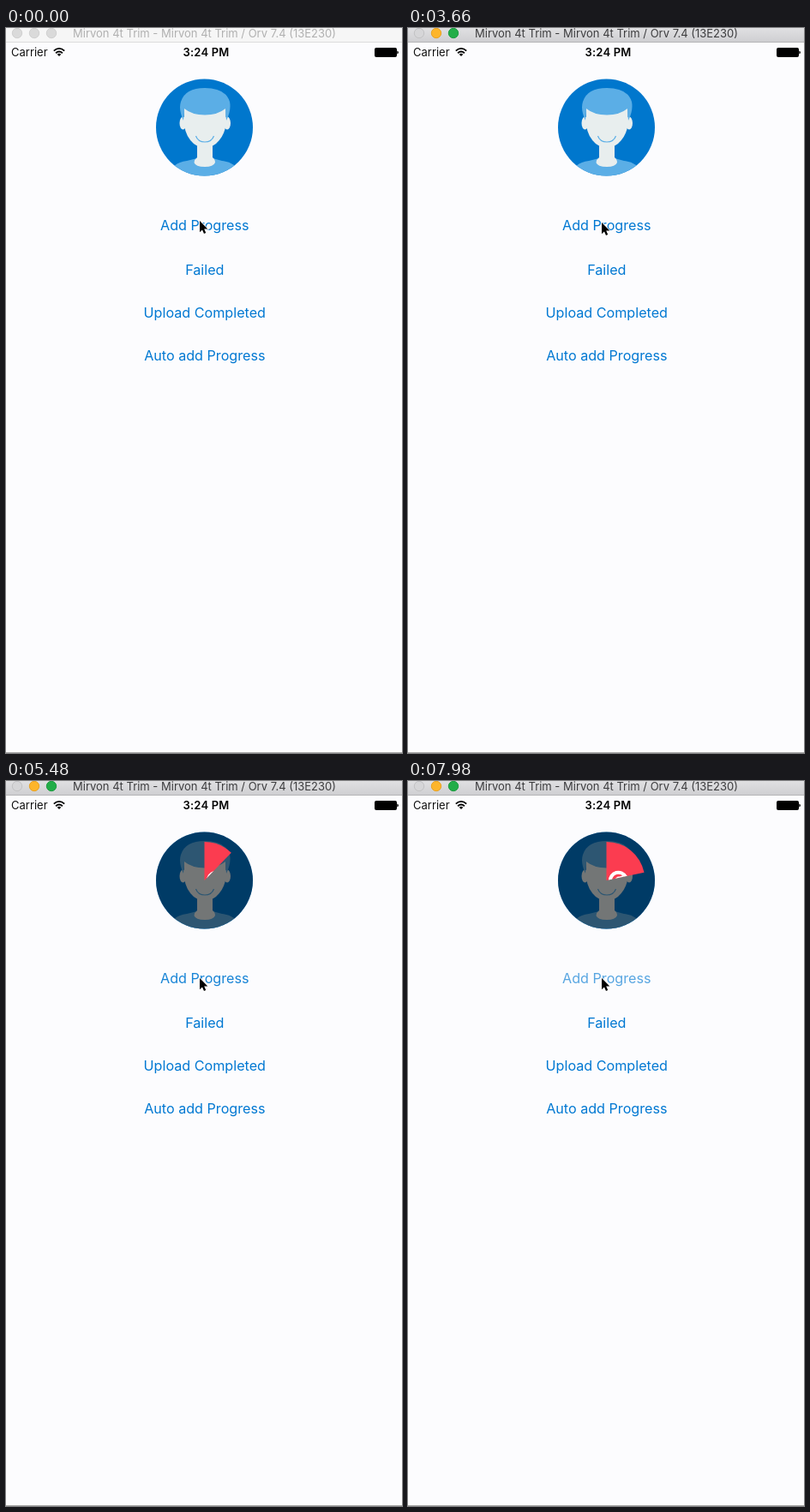
An HTML page that plays this animation: 462x846 px, repeating every 8000 ms.

```html
<!DOCTYPE html>
<html lang="en">
<head>
<meta charset="utf-8">
<title>Upload progress</title>
<style>
  html, body { margin: 0; width: 100%; height: 100%; overflow: hidden; background: #fcfcfe; }
  svg { display: block; width: 462px; height: 846px; }
  text { font-family: Inter, "Open Sans", sans-serif; font-size: 13px; }
  .mid { text-anchor: middle; }
  .button { font-size: 16.15px; fill: #0078d2; text-anchor: middle; }
  .skin { fill: #e8eeee; }
  .cloth { fill: #5baee6; }
</style>
</head>
<body>
<svg viewBox="0 0 462 846">
  <defs>
    <linearGradient id="active" x2="0" y2="1">
      <stop offset="0" stop-color="#e0e0e2"/>
      <stop offset="1" stop-color="#cfcfd2"/>
    </linearGradient>
    <clipPath id="disc"><circle cx="231.5" cy="116" r="56.5"/></clipPath>
    <clipPath id="slice"><path id="sliceShape"/></clipPath>
  </defs>
  <rect width="462" height="846" fill="#fcfcfe"/>

  <rect id="bar" width="462" height="16"/>
  <rect id="barEdge" y="16" width="462" height="1"/>
  <g id="lights" stroke-width="1">
    <circle cx="13" cy="6" r="5.7"/>
    <circle cx="33" cy="6" r="5.7"/>
    <circle cx="53" cy="6" r="5.7"/>
  </g>
  <text id="title" class="mid" x="231.5" y="11">Mirvon 4t Trim - Mirvon 4t Trim / Orv 7.4 (13E230)</text>

  <text x="6" y="33.3" fill="#111">Carrier</text>
  <g fill="none" stroke="#000" stroke-width="1.8">
    <path d="M55.8 26.6Q62 21.2 68.2 26.6M58.1 29.2Q62 25.8 65.9 29.2"/>
    <path d="M62 33L59.7 30.7Q62 28.9 64.3 30.7Z" fill="#000" stroke="none"/>
  </g>
  <text class="mid" x="233.5" y="33.3" font-weight="600" letter-spacing=".2">3:24 PM</text>
  <rect x="430" y="23" width="26" height="11" rx="2"/>
  <path d="M456.3 26.5q1.6 .5 1.6 2t-1.6 2z"/>

  <g clip-path="url(#disc)">
    <rect x="174" y="59" width="115" height="115" fill="#0077cd"/>
    <path class="cloth" d="M190 173Q193 157 211 155L223 152H241L252 155Q270 157 274 173Z"/>
    <path class="skin" d="M223 134H241V151Q244 153 244 157Q242 162 232 162Q221 162 219.5 157Q220 153 223 151Z"/>
    <ellipse class="skin" cx="206.5" cy="111" rx="4" ry="7.5"/>
    <ellipse class="skin" cx="258" cy="111" rx="4" ry="7.5"/>
    <path class="skin" d="M207.5 88H256.5V114Q254 127 245 135Q238 140 232 140Q226 140 219 135Q210 127 208 114Z"/>
    <path class="cloth" d="M207 108Q201 95 204 86Q209 70 232 70Q256 70 261 86Q263 96 257 108L256 94Q247 101.5 232 101.5Q217 101.5 208 94Z"/>
    <path d="M221.5 126Q224 133 232 133Q240 133 242.5 126" fill="none" stroke="#5baee6" stroke-width="1.2"/>
  </g>
  <g id="progress">
    <circle cx="231.5" cy="116" r="56.5" fill="#000" opacity=".5"/>
    <g clip-path="url(#slice)">
      <rect x="186" y="70" width="92" height="92" fill="#fb3c50"/>
      <path d="M236 117A9.5 9.5 0 0 1 254 112" fill="none" stroke="#fff" stroke-width="4"/>
      <path d="M241 117Q242 111 247 111.5L251 110V117Z" fill="#fff"/>
    </g>
  </g>

  <text id="add" class="button" x="231.8" y="236">Add Progress</text>
  <text class="button" x="231.8" y="287.5">Failed</text>
  <text class="button" x="231.8" y="338">Upload Completed</text>
  <text class="button" x="231.8" y="387.7">Auto add Progress</text>

  <rect y="845" width="462" height="1" fill="#a8a8a8"/>
  <path id="cursor" d="M0 0V13.2L3 10.4L5 15L7.2 14.1L5.2 9.6H9.3Z" stroke="#fcfcfe" stroke-width="1.6" paint-order="stroke"/>
</svg>
<script>
const LOOP = 8000, FOCUS = 2000, FADE = 500, STEP = 50;
const CLICKS = [{ down: 4700, up: 5040 }, { down: 7540, up: 7700 }];
const $ = id => document.getElementById(id);
const ramp = (t, from, length) => Math.min(1, Math.max(0, (t - from) / length));

function paintWindow(focused) {
  $('bar').setAttribute('fill', focused ? 'url(#active)' : '#f6f6f6');
  $('barEdge').setAttribute('fill', focused ? '#b4b4b6' : '#dcdcdc');
  $('title').setAttribute('fill', focused ? '#3c3c3e' : '#b0b0b0');
  const fills = focused ? ['#d6d6d8', '#fdb52b', '#22ad48'] : Array(3).fill('#dadada');
  const edges = focused ? ['#c2c2c4', '#e8a324', '#1c9c40'] : Array(3).fill('#d0d0d0');
  [...$('lights').children].forEach((dot, i) => {
    dot.setAttribute('fill', fills[i]);
    dot.setAttribute('stroke', edges[i]);
  });
}

function paintSlice(degrees) {
  const a = degrees * Math.PI / 180, r = 45;
  const x = 231.5 + r * Math.sin(a), y = 116 - r * Math.cos(a);
  $('sliceShape').setAttribute('d', `M231.5 116V71A${r} ${r} 0 0 1 ${x} ${y}Z`);
}

function render(t) {
  paintWindow(t >= FOCUS);
  let degrees = 0, alpha = 1;
  for (const { down, up } of CLICKS) {
    const p = ramp(t, up, FADE);
    degrees += STEP * p;
    if (t >= down) alpha = 0.2 + 0.8 * p;
  }
  paintSlice(degrees);
  $('progress').setAttribute('visibility', t >= CLICKS[0].up ? 'visible' : 'hidden');
  $('add').setAttribute('opacity', alpha);
  $('cursor').setAttribute('transform', `translate(226 ${225 + 5 * ramp(t, 3500, 400)})`);
}

const start = performance.now();
function tick() {
  render((performance.now() - start) % LOOP);
  requestAnimationFrame(tick);
}
tick();
</script>
</body>
</html>
```
